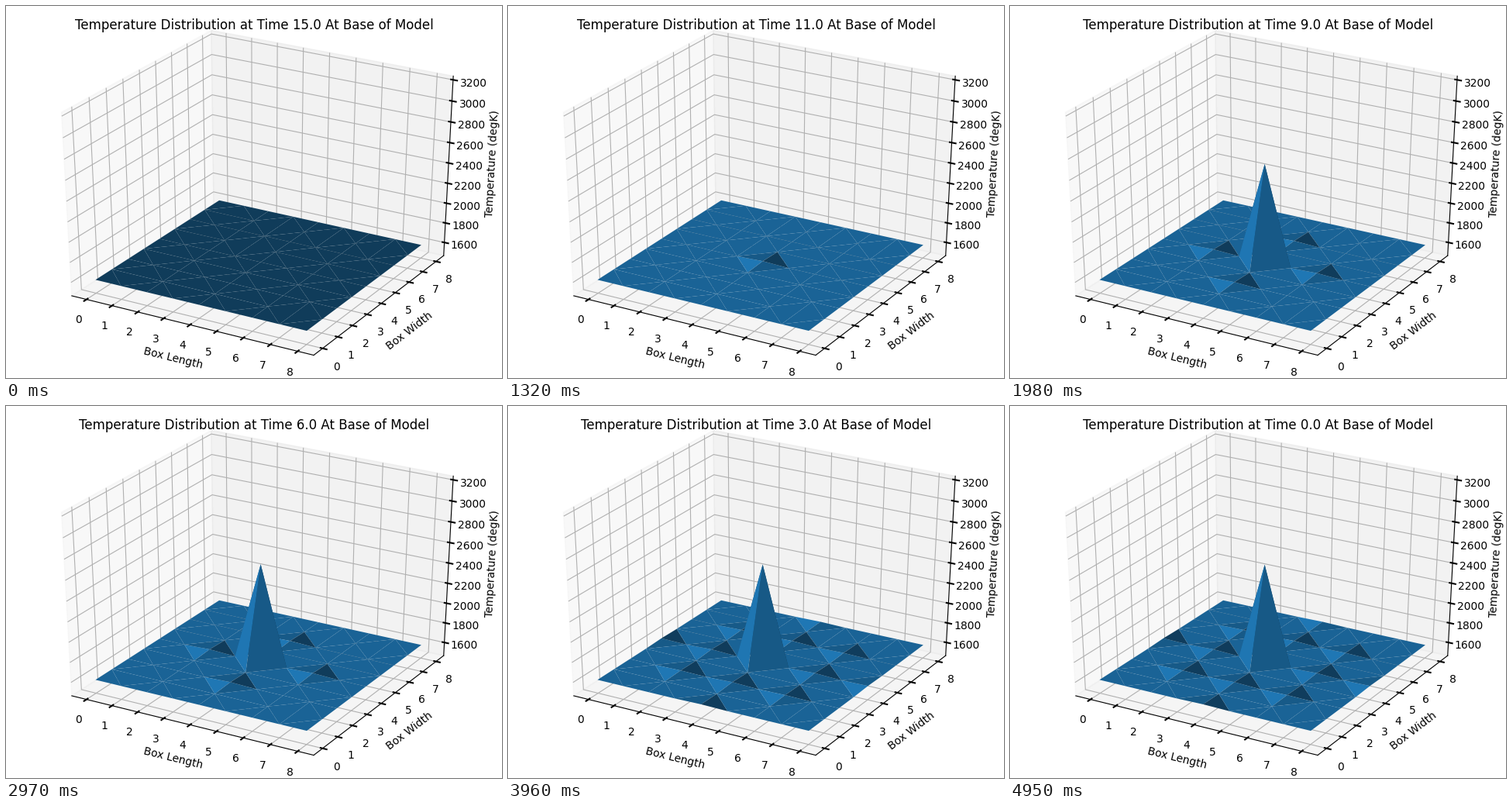
Animation, 640 px wide and 480 px high, one loop 5.28 s. Source, as a matplotlib script:

```python
import numpy as np
import matplotlib.pyplot as plt
from matplotlib.animation import FuncAnimation
from matplotlib.collections import LineCollection, PolyCollection
from matplotlib.colors import to_rgb
from matplotlib.patches import Polygon
from matplotlib.tri import Triangulation

plt.rcParams["font.family"] = "DejaVu Sans"

STEPS = 16
BASE = 1600
LOW = np.array([-0.4, -0.4, 1500])
SPAN = np.array([8.8, 8.8, 1700])
EDGE = 0.5 + 1 / 48      # half size of the drawn box
DELTA = 1 / 12           # unit for tick lengths and label gaps
POINT = 48 / (72 * (6.4 + 4.8)) * DELTA

# Camera at elevation 30, azimuth -60, distance 10
elev, azim = np.radians([30, -60])
NEAR = np.array([np.cos(azim) * np.cos(elev), np.sin(azim) * np.cos(elev), np.sin(elev)])
RIGHT = np.array([-np.sin(azim), np.cos(azim), 0])
UP = np.cross(NEAR, RIGHT)


def depth(p):
    return 10 - np.asarray(p) @ NEAR


def project(p):
    """Screen position of points in the centred unit box."""
    p = np.asarray(p, float)
    return np.stack([p @ RIGHT, p @ UP], -1) / depth(p)[..., None]


def to_box(data):
    return (data - LOW) / SPAN - 0.5


fig = plt.figure(figsize=(6.4, 4.8), dpi=100, facecolor="white")
ax = fig.add_axes([0, 0, 1, 1])
ax.set_xlim(-0.095, 0.09)
ax.set_ylim(-0.095, 0.09)
ax.axis("off")


def draw_pane(axis, side, grey):
    corners = np.full((4, 3), side * EDGE)
    others = [i for i in range(3) if i != axis]
    corners[:, others] = EDGE * np.array([(-1, -1), (1, -1), (1, 1), (-1, 1)])
    ax.add_patch(Polygon(project(corners), facecolor=(grey,) * 3, edgecolor=(grey,) * 3,
                         alpha=0.5, linewidth=1, zorder=1))


def draw_axis(axis, edge, tick_dir, ticks, name):
    """Grid, line, ticks and labels of one axis; edge holds the signs of its box edge."""
    edge = np.array(edge, float)
    free = np.arange(3) != axis
    back = np.array([-1, 1, -1]) * EDGE

    grid = []
    for value in ticks:
        pos = (value - LOW[axis]) / SPAN[axis] - 0.5
        line = np.tile(back, (3, 1))
        line[:, axis] = pos
        line[0, (axis + 1) % 3] *= -1
        line[2, (axis + 2) % 3] *= -1
        grid.append(project(line))

        ends = np.tile(edge * EDGE, (2, 1))
        ends[:, axis] = pos
        ends[:, tick_dir] += edge[tick_dir] * DELTA * np.array([-0.1, 0.2])
        ax.plot(*project(ends).T, color="black", lw=1.5, zorder=3)

        label = edge * (EDGE + 11.5 * POINT)
        label[axis] = pos
        ax.text(*project(label), str(value), fontsize=10, ha="center", va="top", zorder=3)
    ax.add_collection(LineCollection(grid, colors="#b0b0b0", linewidths=0.8, zorder=2),
                      autolim=False)

    ends = np.tile(edge * EDGE, (2, 1))
    ends[:, axis] = -EDGE, EDGE
    line = project(ends)
    ax.plot(*line.T, color="black", lw=0.8, zorder=3)

    dx, dy = (line[1] - line[0]) * (640, 480)
    place = np.where(free, edge * (EDGE + 25 * POINT), 0)
    ax.text(*project(place), name, fontsize=10, ha="center", va="center",
            rotation=np.degrees(np.arctan2(dy, dx)), rotation_mode="anchor", zorder=3)


draw_pane(0, -1, 0.95)
draw_pane(1, 1, 0.90)
draw_pane(2, -1, 0.925)
draw_axis(0, (0, -1, -1), 1, range(9), "Box Length")
draw_axis(1, (1, 0, -1), 0, range(9), "Box Width")
draw_axis(2, (1, 1, 0), 0, range(1600, 3201, 200), "Temperature (degK)")

# Element corners and mid-side nodes; element centres have no node
nodes = np.array([(x, y) for x in range(9) for y in range(9) if x % 2 == 0 or y % 2 == 0])
faces = Triangulation(nodes[:, 0], nodes[:, 1]).triangles
is_corner = (nodes % 2 == 0).all(axis=1)
reach = np.where(is_corner, np.abs(nodes - 4).sum(axis=1), 99)

surface = PolyCollection([], edgecolors="none", zorder=5)
ax.add_collection(surface, autolim=False)
title = ax.text(0, 0, "", transform=ax.transAxes, fontsize=12, ha="center",
                va="baseline", zorder=6)
title.set_position((0.5, 0.92 + 6 / 72 / 4.8))


def temperature(t):
    rise = np.zeros(len(nodes))
    if t == 11:
        rise[reach == 0] = 10
    elif t < 11:
        rise[reach == 0] = 966 + 0.6 * t
        rise[reach == 2] = 10
        if t < 5:
            rise[reach == 4] = 5
    return BASE + rise


def shade(tris):
    """Face colours from the light direction, spread over the range found."""
    normals = np.cross(tris[:, 0] - tris[:, 1], tris[:, 1] - tris[:, 2])
    normals /= np.linalg.norm(normals, axis=1, keepdims=True)
    light = normals @ np.array([-1, -1, 0.5])
    light -= light.min()
    if light.max() > 1e-9:
        light /= light.max()
    return np.outer(0.5 + 0.5 * light, to_rgb("#1f77b4"))


def update(step):
    t = 6 if step == 10 else 15 - step    # time 5 is skipped, 6 stays on
    tris = np.column_stack([nodes, temperature(t)])[faces]
    box = to_box(tris)
    order = np.argsort(-depth(box).mean(axis=1), kind="stable")
    surface.set_verts(project(box)[order])
    surface.set_facecolor(shade(tris)[order])
    title.set_text(f"Temperature Distribution at Time {t:.1f} At Base of Model")
    return surface, title


anim = FuncAnimation(fig, update, frames=STEPS, interval=330, repeat=True, repeat_delay=0)
plt.show()
```
